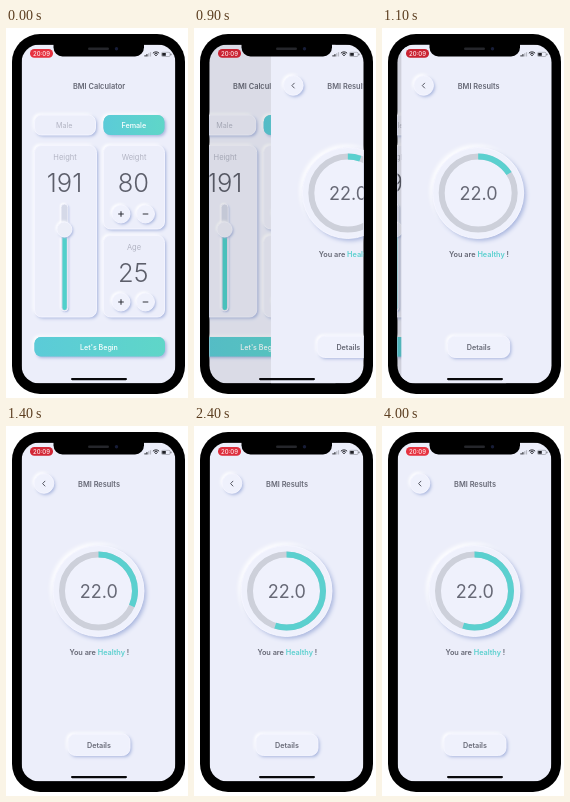
These frames come from a looping animation (182 by 370 pixels, 4050 ms). An HTML page with a canvas:

```html
<!DOCTYPE html>
<html lang="en">
<head>
<meta charset="utf-8">
<title>BMI Calculator</title>
<style>
html, body { margin: 0; width: 100%; height: 100%; overflow: hidden; background: #fff; }
canvas { display: block; width: 182px; height: 370px; }
</style>
</head>
<body>
<canvas id="stage"></canvas>
<script>
const W = 182, H = 370, LOOP = 4050;
const SCREEN = { x: 15.5, y: 16.5, w: 154, h: 339 };
const PUSH = { start: 797, length: 435, parallax: .3 };
const RING = { start: 795, length: 1050, share: 22 / 40 };
const BG = '#eceefa', INK = '#666875', DIGIT = '#5c5e6a', PALE = '#b2b4c3', TEAL = '#5bd0cf';

const canvas = document.getElementById('stage');
const ctx = canvas.getContext('2d');
const dpr = window.devicePixelRatio || 1;
canvas.width = W * dpr;
canvas.height = H * dpr;

const clamp = v => Math.max(0, Math.min(1, v));

// Cubic bezier easing, solved by bisection
function ease(t, x1 = .35, y1 = .91, x2 = .33, y2 = .97) {
  if (t <= 0 || t >= 1) return clamp(t);
  const at = (s, a, b) => 3 * (1 - s) ** 2 * s * a + 3 * (1 - s) * s * s * b + s ** 3;
  let lo = 0, hi = 1;
  for (let i = 0; i < 24; i++) {
    const mid = (lo + hi) / 2;
    if (at(mid, x1, x2) < t) lo = mid; else hi = mid;
  }
  return at(lo, y1, y2);
}

function text(str, x, y, size, color, weight = 400, align = 'center') {
  ctx.font = `${weight} ${size}px Inter, "Liberation Sans", sans-serif`;
  ctx.textAlign = align;
  ctx.fillStyle = color;
  ctx.fillText(str, x, y);
}

function box(x, y, w, h, r) {
  ctx.beginPath();
  ctx.roundRect(x, y, w, h, r);
}

function disc(x, y, r) {
  ctx.beginPath();
  ctx.arc(x, y, r, 0, Math.PI * 2);
}

function line(color, width, ...pts) {
  ctx.beginPath();
  pts.forEach(([x, y]) => ctx.lineTo(x, y));
  ctx.strokeStyle = color;
  ctx.lineWidth = width;
  ctx.stroke();
}

// Raised soft surface: light from the top left, shade to the bottom right
function raise(shape, fill = BG, depth = 1.6, rim = '#f6f7ff') {
  for (const [color, d] of [['#ffffff', -depth], ['#a9b6de', depth]]) {
    ctx.save();
    ctx.shadowColor = color;
    ctx.shadowBlur = depth * 2 * dpr;
    ctx.shadowOffsetX = ctx.shadowOffsetY = d * dpr;
    shape();
    ctx.fillStyle = fill;
    ctx.fill();
    ctx.restore();
  }
  if (rim) {
    shape();
    ctx.strokeStyle = rim;
    ctx.lineWidth = .9;
    ctx.stroke();
  }
}

function tealFill(x, w) {
  const g = ctx.createLinearGradient(x, 0, x + w, 0);
  g.addColorStop(0, '#5bcbd8');
  g.addColorStop(1, '#5fd6c8');
  return g;
}

function page() {
  ctx.fillStyle = BG;
  ctx.fillRect(SCREEN.x, SCREEN.y, SCREEN.w, SCREEN.h);
}

function stepper(label, value, top, bottom) {
  raise(() => box(97.5, top, 61, bottom - top, 7));
  text(label, 128, top + 14.5, 7.5, PALE);
  text(value, 127.3, top + 46.3, 25.5, DIGIT, 350);
  const y = bottom - 15;
  for (const x of [115, 139.5]) {
    raise(() => disc(x, y, 9), '#eff1fc', 1.4);
    line('#33353d', 1.1, [x - 2.8, y], [x + 2.8, y]);
  }
  line('#33353d', 1.1, [115, y - 2.8], [115, y + 2.8]);
}

function formPage() {
  page();
  text('BMI Calculator', 93, 60.5, 7.4, INK, 600);
  raise(() => box(28.5, 87, 61, 20, 7));
  text('Male', 58.3, 99.5, 7.2, PALE);
  raise(() => box(97.5, 87, 61, 20, 7), tealFill(97, 62), 1.6, null);
  text('Female', 127.8, 99.5, 7.2, '#fff', 500);

  raise(() => box(28.5, 117.5, 62, 171.5, 7));
  text('Height', 59, 132, 7.5, PALE);
  text('191', 58.5, 163.8, 25.5, DIGIT, 350);
  raise(() => box(55, 176, 7, 107, 3.5), '#d5d9e8', 1);
  box(56.4, 201, 4.4, 81, 2.2);
  ctx.fillStyle = '#50d0cb';
  ctx.fill();
  raise(() => disc(58.5, 201.5, 7.5), '#eceef8', 1.3);

  stepper('Weight', '80', 117.5, 201);
  stepper('Age', '25', 207.5, 289);

  raise(() => box(28.5, 309, 130.5, 19.5, 6.5), tealFill(28, 131), 1.6, null);
  text("Let's Begin", 93, 321.5, 7.1, '#fff', 500);
}

function ring(x, y, share) {
  raise(() => disc(x, y, 45.5), '#eff1fc', 2.2);
  const from = -Math.PI / 2;
  disc(x, y, 36.5);
  ctx.strokeStyle = '#cdd0da';
  ctx.lineWidth = 6;
  ctx.stroke();
  if (share > 0) {
    ctx.beginPath();
    ctx.arc(x, y, 36.5, from, from + share * Math.PI * 2);
    ctx.strokeStyle = TEAL;
    ctx.stroke();
  }
  text('22.0', x + .3, y + 6.8, 18, INK, 400);
}

function message(cx, y) {
  const parts = [['You are ', INK], ['Healthy', TEAL], [' !', INK]];
  const size = 7.3;
  ctx.font = `600 ${size}px Inter, "Liberation Sans", sans-serif`;
  const widths = parts.map(p => ctx.measureText(p[0]).width);
  let x = cx - widths.reduce((a, b) => a + b) / 2;
  parts.forEach(([str, color], i) => {
    text(str, x, y, size, color, 600, 'left');
    x += widths[i];
  });
}

function resultPage(t) {
  page();
  raise(() => disc(38, 57.5, 9.8), '#eff1fc', 1.6);
  line('#555762', 1, [39.2, 54.9], [36.6, 57.6], [39.2, 60.3]);
  text('BMI Results', 93, 60.5, 7.4, INK, 600);
  ring(92.5, 165, RING.share * clamp((t - RING.start) / RING.length));
  message(93.3, 229);
  raise(() => box(62, 308, 62, 21.5, 7.5), '#eff1fc');
  text('Details', 93, 321.5, 7.2, INK, 600);
}

function shifted(dx, draw) {
  ctx.save();
  ctx.translate(dx, 0);
  box(SCREEN.x, SCREEN.y, SCREEN.w, SCREEN.h, 0);
  ctx.clip();
  draw();
  ctx.restore();
}

function phone() {
  ctx.fillStyle = '#000';
  box(6, 6, 173, 360, 28);
  ctx.fill();
}

function notch() {
  ctx.fillStyle = '#000';
  box(47.5, 10, 90.5, 18.5, [0, 0, 9, 9]);
  ctx.fill();
  box(82, 19.5, 21, 2.4, 1.2);
  ctx.fillStyle = '#25262b';
  ctx.fill();
  disc(110.5, 20.7, 1.7);
  ctx.fillStyle = '#171d38';
  ctx.fill();
}

function statusBar(t) {
  const glow = .5 + .5 * Math.cos(t / LOOP * Math.PI * 4);
  ctx.fillStyle = `rgb(${200 + 30 * glow}, ${34 + 16 * glow}, ${50 + 14 * glow})`;
  box(24, 21, 23, 8.7, 4.3);
  ctx.fill();
  text('20:09', 35.5, 27.6, 6, '#ffe9ec', 500);

  ctx.fillStyle = '#202127';
  for (let i = 0; i < 4; i++) {
    ctx.globalAlpha = i < 2 ? 1 : .25;
    const h = 1.3 + i;
    ctx.fillRect(138.5 + i * 1.8, 28.5 - h, 1.2, h);
  }
  ctx.globalAlpha = 1;
  ctx.strokeStyle = '#202127';
  ctx.lineWidth = 1;
  for (const r of [1, 2.7, 4.4]) {
    ctx.beginPath();
    ctx.arc(150, 28.3, r, -Math.PI * .75, -Math.PI * .25);
    ctx.stroke();
  }
  box(155.5, 24.3, 8.6, 4.2, 1.2);
  ctx.strokeStyle = '#8b8d96';
  ctx.lineWidth = .6;
  ctx.stroke();
  ctx.fillRect(156.2, 25, 3.6, 2.8);
  ctx.fillRect(164.7, 25.7, .6, 1.5);

  ctx.fillStyle = '#08080a';
  box(65, 350, 56, 2.2, 1.1);
  ctx.fill();
}

function draw(t) {
  ctx.setTransform(dpr, 0, 0, dpr, 0, 0);
  ctx.fillStyle = '#fff';
  ctx.fillRect(0, 0, W, H);
  phone();

  ctx.save();
  box(SCREEN.x, SCREEN.y, SCREEN.w, SCREEN.h, 18);
  ctx.clip();
  const p = ease(clamp((t - PUSH.start) / PUSH.length));
  if (p < 1) {
    shifted(-SCREEN.w * PUSH.parallax * p, formPage);
    ctx.fillStyle = `rgba(0, 0, 0, ${.13 * p})`;
    ctx.fillRect(SCREEN.x, SCREEN.y, SCREEN.w, SCREEN.h);
  }
  if (p > 0) shifted(SCREEN.w * (1 - p), () => resultPage(t));
  statusBar(t);
  ctx.restore();
  notch();
}

const begin = performance.now();
function frame() {
  draw((performance.now() - begin) % LOOP);
  requestAnimationFrame(frame);
}
frame();
</script>
</body>
</html>
```
